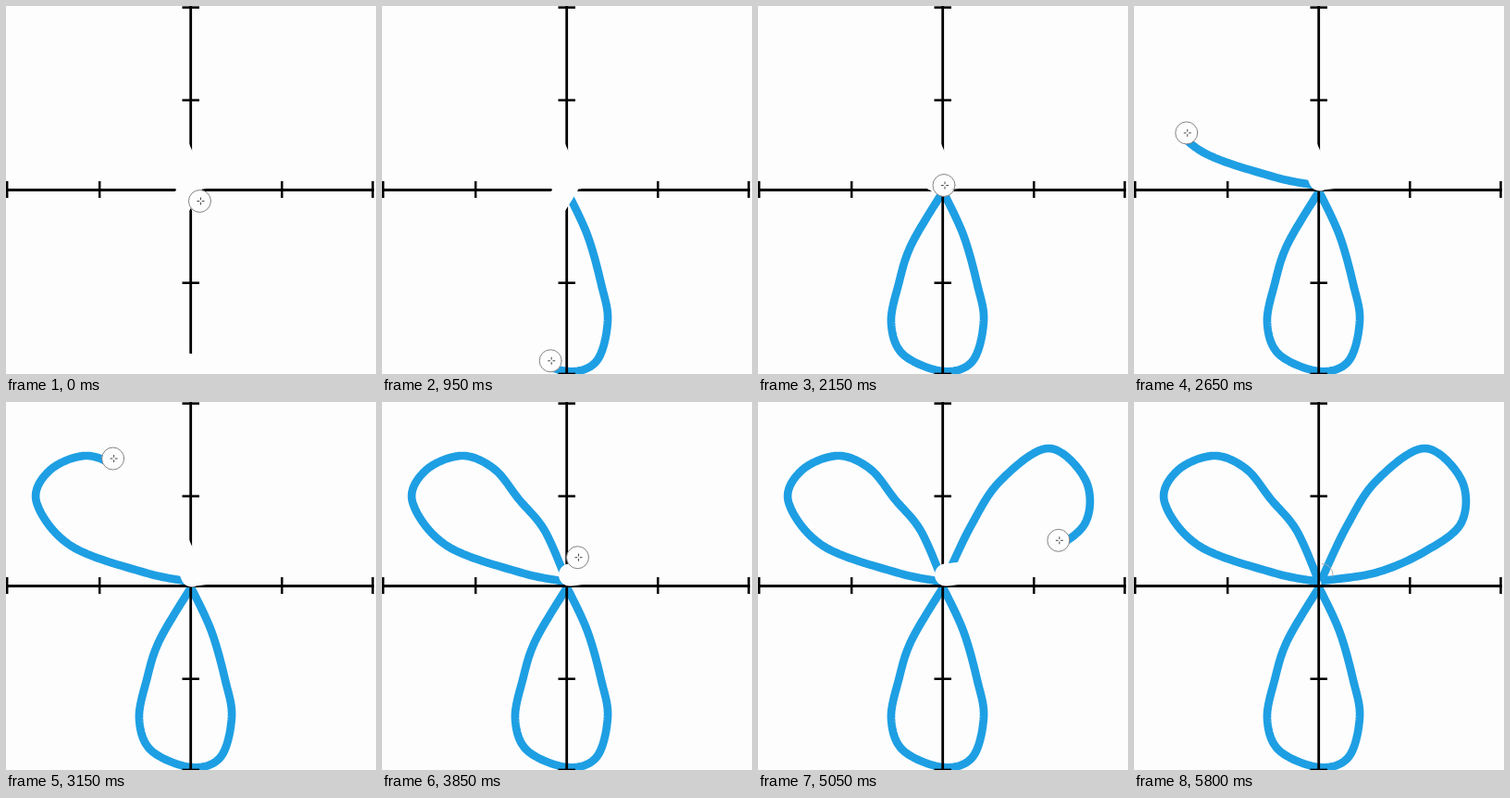
Animation, 400 px wide and 397 px high, one loop 5.85 s. Source, as an HTML page with a canvas:

```html
<!DOCTYPE html>
<html lang="en">
<head>
<meta charset="utf-8">
<title>Three-petal rose curve</title>
<style>
html, body { margin: 0; width: 100%; height: 100%; overflow: hidden; background: #fefdfe; }
canvas { display: block; }
</style>
</head>
<body>
<canvas id="stage" width="400" height="397"></canvas>
<script>
const ctx = document.getElementById('stage').getContext('2d');
const PAPER = '#fefdfe', BLUE = '#1e9fe3';
const LOOP = 5850, STEP = 50, LAST = LOOP / STEP - 1;
const RADIUS = 12, DRIFT = [1, -6.5];
const TICKS = [-198.3, -98.3, 98.8, 197];

// Each petal: when the pointer traces it, its easing power and its key points
const petals = [
  { from: -40, to: 2150, ease: 0.8, keys: [[200,200],[222,247],[237,300],[244,340],[232,383],
    [200,394],[157,376],[144,342],[152,300],[166,257],[200,200]] },
  { from: 2150, to: 3650, ease: 1, keys: [[200,194],[150,184],[70,155],[33,108],[47,74],
    [86,58],[121,72],[148,105],[176,139],[200,194]] },
  { from: 3770, to: 5550, ease: 1, keys: [[202,193],[230,134],[262,85],[314,50],[354,84],
    [354,130],[315,161],[262,184],[202,193]] }
];

// Catmull-Rom spline through the keys, as a fine polyline
function smooth(keys, n = 16) {
  const out = [keys[0]];
  for (let i = 0; i < keys.length - 1; i++) {
    const b = keys[i], c = keys[i + 1], a = keys[i - 1] || b, d = keys[i + 2] || c;
    for (let j = 1; j <= n; j++) {
      const u = j / n;
      out.push([0, 1].map(k => b[k] + u / 2 * (c[k] - a[k] +
        u * (2 * a[k] - 5 * b[k] + 4 * c[k] - d[k] +
        u * (3 * (b[k] - c[k]) + d[k] - a[k])))));
    }
  }
  return out;
}

function pointAlong(line, part) {
  const gap = i => Math.hypot(line[i][0] - line[i - 1][0], line[i][1] - line[i - 1][1]);
  let total = 0;
  for (let i = 1; i < line.length; i++) total += gap(i);
  let left = total * part;
  for (let i = 1; i < line.length; i++) {
    const g = gap(i);
    if (left <= g) return [0, 1].map(k => line[i - 1][k] + (line[i][k] - line[i - 1][k]) * left / g);
    left -= g;
  }
  return line[line.length - 1];
}

for (const p of petals) p.line = smooth(p.keys);

function pointerAt(t) {
  const p = petals.find(p => t <= p.to) || petals[petals.length - 1];
  const u = Math.min(1, Math.max(0, (t - p.from) / (p.to - p.from)));
  const [x, y] = pointAlong(p.line, u ** p.ease);
  return [x + DRIFT[0], y + DRIFT[1]];
}

const trail = Array.from({ length: LAST + 1 }, (_, i) => pointerAt(i * STEP));

function stroke(points, color, width, cap = 'butt') {
  ctx.strokeStyle = color;
  ctx.lineWidth = width;
  ctx.lineCap = cap;
  ctx.lineJoin = 'round';
  ctx.beginPath();
  for (const p of points) ctx.lineTo(...p);
  ctx.stroke();
}

function arc([x, y], color, from, to) {
  ctx.strokeStyle = color;
  ctx.lineWidth = 0.9;
  ctx.beginPath();
  ctx.arc(x, y, RADIUS, from, to);
  ctx.stroke();
}

function drawGraph() {
  for (const p of petals) stroke(p.line, BLUE, 8.7);
  stroke([[0, 198.5], [398, 198.5]], '#000', 2.8);
  stroke([[199.7, 0], [199.7, 397]], '#000', 2.8);
  for (const d of TICKS) {
    const x = 199.5 + d, y = 199.9 + d;
    stroke([[x, 189], [x, 207]], '#000', 2.5);
    stroke([[190.5, y], [209, y]], '#000', 2.5);
  }
}

function drawPointer([x, y]) {
  arc([x, y], '#777', 0, Math.PI * 2);
  for (const [dx, dy] of [[1, 0], [-1, 0], [0, 1], [0, -1]])
    stroke([[x + 1 + dx * 1.3, y + dy * 1.3], [x + 1 + dx * 4, y + dy * 4]], '#444', 1);
}

function draw(step) {
  ctx.fillStyle = PAPER;
  ctx.fillRect(0, 0, 400, 397);
  drawGraph();
  if (step < LAST) {
    // The rest of the route stays blank until the pointer has passed
    stroke(trail.slice(step), PAPER, RADIUS * 2, 'round');
    drawPointer(trail[step]);
  } else {
    arc(trail[LAST], '#aaa', -Math.PI / 2, 0.2);
  }
}

const start = performance.now();
function tick() {
  const t = (performance.now() - start) % LOOP;
  draw(Math.min(LAST, Math.floor(t / STEP)));
  requestAnimationFrame(tick);
}
tick();
</script>
</body>
</html>
```
